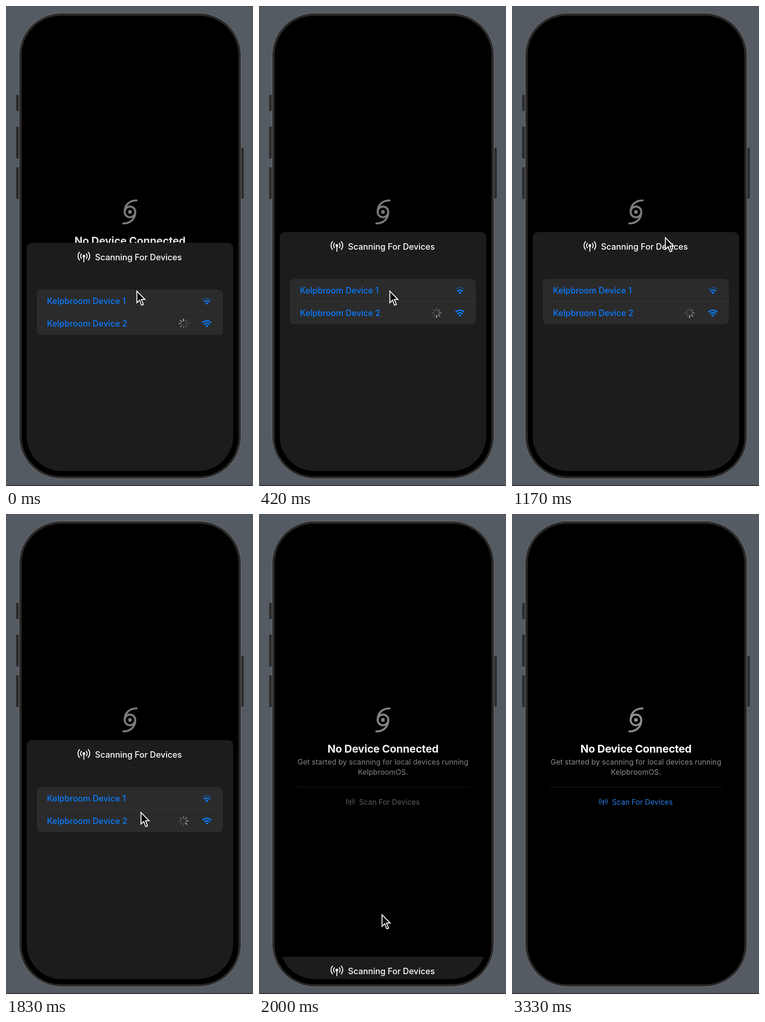
These frames come from a looping animation (537x1042 px, 3830 ms). An HTML page:

```html
<!DOCTYPE html>
<html lang="en">
<head>
<meta charset="utf-8">
<title>Device scan</title>
<style>
  html, body { margin: 0; width: 100%; height: 100%; overflow: hidden; background: #555b62; }
  svg { display: block; width: 100vw; height: 100vh; }
  text { font-family: Inter, "Noto Sans", sans-serif; font-optical-sizing: none; }
  .mid { text-anchor: middle; }
  .title { font-size: 23.3px; font-weight: 700; letter-spacing: -.25px; fill: #fff; }
  .note { font-size: 16px; fill: #8c8c90; }
  .head { font-size: 18.2px; font-weight: 500; fill: #fff; }
  .row { font-size: 18.2px; font-weight: 500; fill: #0a7cff; }
  .scan { font-size: 16px; fill: currentColor; }
  .line { fill: none; stroke: currentColor; stroke-linecap: round; }
</style>
</head>
<body>
<svg viewBox="0 0 537 1042">
  <defs>
    <g id="antenna">
      <circle cy="-2" r="2.9" fill="currentColor"/>
      <path class="line" stroke-width="2" d="M0 -2V10.5
        M-5.2 -7A7.2 7.2 0 0 0 -5.2 3M5.2 -7A7.2 7.2 0 0 1 5.2 3
        M-9.4 -10.6A12.7 12.7 0 0 0 -9.4 6.6M9.4 -10.6A12.7 12.7 0 0 1 9.4 6.6"/>
    </g>
    <path id="wave" d="M-9.7 -2A14 14 0 0 1 9.7 -2" fill="none" stroke="#0a7cff" stroke-width="2.9"/>
    <g id="near">
      <path d="M-6.1 1.8A8.8 8.8 0 0 1 6.1 1.8" fill="none" stroke="#0a7cff" stroke-width="2.9"/>
      <path d="M0 8L-3.3 4.7A4.7 4.7 0 0 1 3.3 4.7Z" fill="#0a7cff"/>
    </g>
    <clipPath id="floor"><rect x="45" y="400" width="449" height="609.5" rx="76"/></clipPath>
  </defs>

  <rect width="537" height="1042" fill="#555b62"/>
  <rect width="537" height="1" fill="#4a4f56"/>
  <rect y="1040" width="537" height="2" fill="#303337"/>

  <!-- phone body -->
  <g fill="#2b2b2b">
    <rect x="22" y="193" width="7" height="35" rx="1"/>
    <rect x="22" y="262" width="7" height="69" rx="1"/>
    <rect x="22" y="350" width="7" height="69" rx="1"/>
    <rect x="510" y="308" width="7" height="110" rx="1"/>
  </g>
  <rect x="28.5" y="15.5" width="482.5" height="1010.5" rx="92" fill="#292929" stroke="#747474"/>
  <rect x="34" y="21" width="471.5" height="1000" rx="86"/>

  <!-- empty state -->
  <g id="home">
    <g class="line" color="#8e8e90" stroke-width="4.2">
      <circle cx="269.5" cy="447" r="11.6"/>
      <path d="M257.9 447C257.9 433 267 422 284 422M281.1 447C281.1 461 272 472 255 472"/>
      <circle cx="269.5" cy="447" r="4" fill="#8e8e90" stroke="none"/>
    </g>
    <text class="mid title" x="269.5" y="518.3">No Device Connected</text>
    <text class="mid note" x="269.5" y="543.7">Get started by scanning for local devices running</text>
    <text class="mid note" x="269.5" y="566.3">KelpbroomOS.</text>
    <rect x="80" y="592.5" width="378.5" height="1" fill="#1d1d1f"/>
  </g>
  <g id="button">
    <use href="#antenna" transform="translate(198.5 625.3) scale(.68)"/>
    <text class="scan" x="217.6" y="631">Scan For Devices</text>
  </g>

  <!-- device sheet -->
  <g clip-path="url(#floor)">
    <g id="sheet">
      <rect x="45" y="491" width="449" height="700" rx="11" fill="#1c1d1b"/>
      <use href="#antenna" x="169.3" y="522" color="#fff"/>
      <text class="head" x="193.6" y="529.2">Scanning For Devices</text>
      <rect x="67" y="592.5" width="404.5" height="98.5" rx="10" fill="#2b2b2c"/>
      <rect x="88" y="641" width="383.5" height="1" fill="#373739"/>
      <text class="row" x="89" y="624.2">Kelpbroom Device 1</text>
      <text class="row" x="89" y="673.3">Kelpbroom Device 2</text>
      <g transform="translate(436.8 617.5)"><use href="#wave" opacity=".35"/><use href="#near"/></g>
      <g transform="translate(436.8 666.5)"><use href="#wave"/><use href="#near"/></g>
      <g id="spinner" transform="translate(386 666.5)"></g>
    </g>
  </g>

  <path id="cursor" d="M1 2.4V27.6L7 22L11.2 33L15.2 31.4L10.8 20.6H18.6Z" fill="#000" stroke="#fff" stroke-width="2"/>
</svg>

<script>
  const LOOP = 3830, FPS = 12, SPOKES = 8;
  const el = id => document.getElementById(id);
  const home = el('home'), button = el('button'), sheet = el('sheet');
  const spinner = el('spinner'), cursor = el('cursor');

  // step, x, y of the pointer tip
  const path = [
    [0, 284, 617], [9, 284, 617], [14, 333, 501], [19, 333, 501], [22, 293, 646],
    [23, 267, 868], [27, 267, 868], [31, 281, 797], [33, 281, 797],
    [35, 285, 803], [37, 285, 803], [38, 287, 809], [39, 79, 715]
  ];

  const spokes = Array.from({ length: SPOKES }, (_, i) => {
    const s = document.createElementNS('http://www.w3.org/2000/svg', 'path');
    s.setAttribute('d', 'M0 -5.8V-9.8');
    s.setAttribute('transform', `rotate(${i * 360 / SPOKES})`);
    s.setAttribute('stroke-width', 2.5);
    s.setAttribute('stroke-linecap', 'round');
    return spinner.appendChild(s);
  });

  function pointAt(step) {
    const i = path.findIndex(p => p[0] >= step);
    if (i < 1) return path[0].slice(1);
    const a = path[i - 1], b = path[i];
    const u = (step - a[0]) / (b[0] - a[0]);
    const e = u * u * (3 - 2 * u);
    return [a[1] + (b[1] - a[1]) * e, a[2] + (b[2] - a[2]) * e];
  }

  function sheetOffset(step) {
    if (step < 23) return step < 5 ? 23 * 0.47 ** step : 0;
    return step === 23 ? 317.5 : 470;
  }

  function draw() {
    const t = performance.now() % LOOP;
    const step = Math.min(40, Math.floor((t + 3.4) * FPS / 1000));
    const open = step < 25;

    sheet.style.display = open ? '' : 'none';
    sheet.setAttribute('transform', `translate(0 ${sheetOffset(step)})`);
    home.setAttribute('opacity', step < 23 ? 0.88 : open ? 0.95 : 1);
    button.setAttribute('color', open ? '#5c5c5e' : '#2b7de6');

    const lead = Math.floor(step * 10 / FPS + 0.75);
    spokes.forEach((s, i) => {
      const age = ((lead - i) % SPOKES + SPOKES) % SPOKES;
      const v = Math.round(Math.max(78, 160 - age * 18));
      s.setAttribute('stroke', `rgb(${v},${v},${v})`);
    });

    cursor.style.display = step < 40 ? '' : 'none';
    if (step < 40) {
      const [x, y] = pointAt(step);
      cursor.setAttribute('transform', `translate(${x - 0.5} ${y - 0.5})`);
    }
    requestAnimationFrame(draw);
  }
  draw();
</script>
</body>
</html>
```
